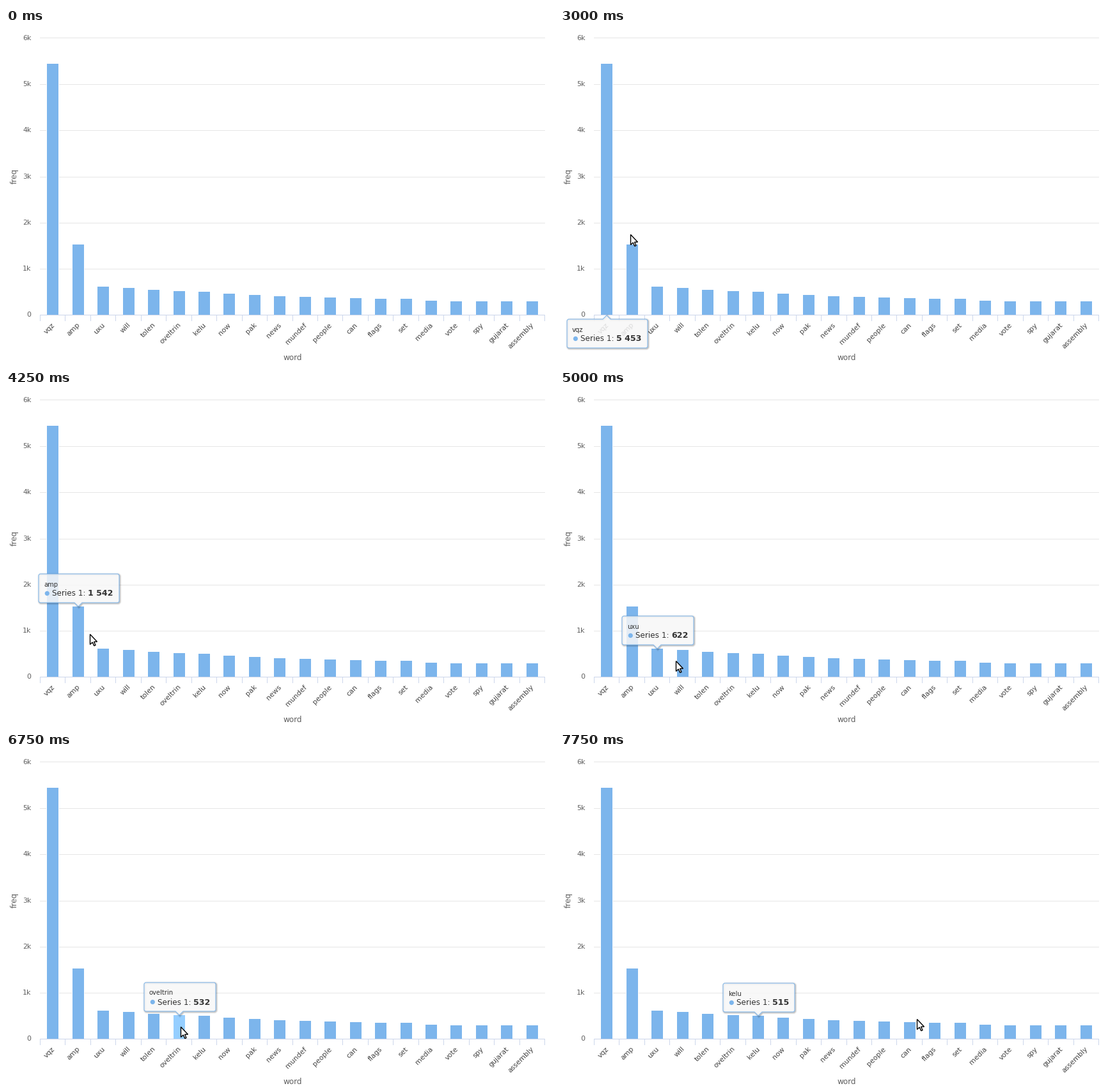
A matplotlib script that plays this animation: 857x523 px, repeating every 8 s.

```python
import matplotlib.pyplot as plt
import numpy as np
from matplotlib.animation import FuncAnimation
from matplotlib.patches import Circle, PathPatch, Polygon, Rectangle
from matplotlib.path import Path

W, H, DPI = 857, 523, 64
STEPS, STEP_MS = 32, 250
LEFT, SPAN, BASE = 53, 790, 449
BAR_W, PITCH = 18, 39.45
BLUE, BRIGHT, AXIS = "#7cb5ec", "#95ceff", "#ccd6eb"
GREY, DARK = "#606060", "#333333"

WORDS = ("vqz amp uxu will tolen oveltrin kelu now pak news mundef people "
         "can flags set media vote spy gujarat assembly").split()
N = len(WORDS)

# a few known counts; the words between them fall off evenly
COUNTS = np.interp(range(N), [0, 1, 2, 5, 6, 8, 10, 14, 15, 19],
                   [5453, 1542, 622, 532, 515, 440, 400, 357, 314, 301]).astype(int)
TOPS = [BASE - int(c * 0.0722 - 0.6) for c in COUNTS]
LEFTS = [round(64.27 + PITCH * i) for i in range(N)]

# pointer stops: step, x, y; it glides evenly from one to the next
STOPS = np.array([(2, 271, 325), (3, 179, 304), (4, 179, 304), (7, 86, 262),
                  (9, 72, 285), (11, 72, 285), (12, 110, 323), (15, 116, 351),
                  (16, 116, 351), (18, 146, 412), (20, 181, 424), (21, 192, 445),
                  (27, 273, 430), (29, 310, 428), (30, 408, 422), (31, 558, 418)])
ARROW = [(0.5, 0.5), (0.5, 16.5), (4.2, 13), (6.8, 18.6), (9, 17.6),
         (6.6, 12.2), (11.5, 12.2)]

plt.rcParams["font.family"] = "DejaVu Sans"
fig = plt.figure(figsize=(W / DPI, H / DPI), dpi=DPI, facecolor="white")
ax = fig.add_axes([0, 0, 1, 1])
ax.set_xlim(0, W)
ax.set_ylim(H, 0)
ax.axis("off")


def px(n):
    """Pixels to points."""
    return n * 72 / DPI


def rect(x, y, w, h, color, z):
    return ax.add_patch(Rectangle((x, y), w, h, fc=color, lw=0, zorder=z))


def label(x, y, text, size, color=GREY, ha="left", z=3, **kw):
    return ax.text(x, y, text, size=px(size), color=color, ha=ha,
                   va="baseline", rotation_mode="anchor", zorder=z, **kw)


def draw_chart():
    for k in range(7):
        if k:
            rect(LEFT, round(449.55 - 72.345 * k), SPAN, 1, "#e6e6e6", 1)
        label(39.5, BASE + 3.3 - 72.25 * k, f"{k}k" if k else "0", 11, ha="right")
    bars = []
    for left, top, word in zip(LEFTS, TOPS, WORDS):
        rect(left - 1, top - 1, BAR_W + 2, BASE - top + 1, "white", 1.5)
        bars.append(rect(left, top, BAR_W, BASE - top, BLUE, 2))
        label(left + 12.5, 465.5, word, 11, "#484848", ha="right", rotation=45)
    rect(LEFT, BASE, SPAN, 1, AXIS, 2)
    for i in range(N + 1):
        rect(round(LEFT + PITCH * i), BASE, 1, 10, AXIS, 2)
    label(448.5, 520, "word", 12, ha="center")
    label(16.8, 232.5, "freq", 12, ha="center", rotation=90)
    return bars


def bubble(x, y, w, h, tip_x, below):
    """Rounded box whose notch points down, or up if the box is below."""
    r, x2, y2 = 3, x + w, y + h
    up = [(tip_x - 6, y), (tip_x, y - 6), (tip_x + 6, y)] if below else []
    down = [] if below else [(tip_x + 6, y2), (tip_x, y2 + 6), (tip_x - 6, y2)]
    verts, codes = [(x + r, y)], [Path.MOVETO]

    def lines(points):
        verts.extend(points)
        codes.extend([Path.LINETO] * len(points))

    def corner(c, end):
        verts.extend([c, end])
        codes.extend([Path.CURVE3] * 2)

    lines(up + [(x2 - r, y)])
    corner((x2, y), (x2, y + r))
    lines([(x2, y2 - r)])
    corner((x2, y2), (x2 - r, y2))
    lines(down + [(x + r, y2)])
    corner((x, y2), (x, y2 - r))
    lines([(x, y + r)])
    corner((x, y), (x + r, y))
    return Path(verts, codes)


def draw_tooltip(i):
    value = f"{COUNTS[i]:,}".replace(",", " ")
    w, h = (126 if len(value) > 3 else 112), 45
    mid = LEFTS[i] + BAR_W / 2
    x = mid - w / 2 + 1
    below = TOPS[i] < 60  # no room above the bar
    y = BASE + 7 if below else TOPS[i] - 51
    shadow = bubble(x + 1, y + 1, w, h, mid + 1, below)
    shape = bubble(x, y, w, h, mid, below)
    parts = [PathPatch(shadow, fc="none", ec="black", lw=px(lw), alpha=a, zorder=5)
             for lw, a in ((5, 0.05), (3, 0.1), (1, 0.15))]
    parts += [PathPatch(shape, fc=(0.97, 0.97, 0.97, 0.85), ec="none", zorder=6),
              PathPatch(shape, fc="none", ec=BLUE, lw=px(1), zorder=7),
              Circle((x + 13.3, y + 30.5), 3.6, fc=BLUE, lw=0, zorder=8)]
    for p in parts:
        ax.add_patch(p)
    return parts + [
        label(x + 8, y + 19.5, WORDS[i], 10, DARK, z=8),
        label(x + 21, y + 34.5, "Series 1:", 12, DARK, z=8),
        label(x + 76.8, y + 34.5, value, 12.6, DARK, z=8, weight="bold")]


def draw_pointer(pos):
    pts = [(pos[0] + dx, pos[1] + dy) for dx, dy in ARROW]
    return ax.add_patch(Polygon(pts, fc="white", ec="black", lw=px(1.4),
                                joinstyle="miter", zorder=10))


def pointer_at(step):
    steps, xs, ys = STOPS.T
    if step < steps[0]:
        return None
    return round(np.interp(step, steps, xs)), round(np.interp(step, steps, ys))


def hovered(step):
    pos = pointer_at(step)
    if pos:
        for i, (left, top) in enumerate(zip(LEFTS, TOPS)):
            if left <= pos[0] < left + BAR_W and top <= pos[1] < BASE:
                return i
    return None


bars = draw_chart()
live = []


def update(step):
    while live:
        live.pop().remove()
    hot = hovered(step)
    for i, bar in enumerate(bars):
        bar.set_facecolor(BRIGHT if i == hot else BLUE)
    # the tooltip stays on the bar that was touched last
    touched = [h for h in map(hovered, range(step + 1)) if h is not None]
    if touched:
        live.extend(draw_tooltip(touched[-1]))
    pos = pointer_at(step)
    if pos:
        live.append(draw_pointer(pos))
    return live


anim = FuncAnimation(fig, update, frames=STEPS, interval=STEP_MS,
                     init_func=lambda: update(0), repeat=True, blit=False)
plt.show()
```
